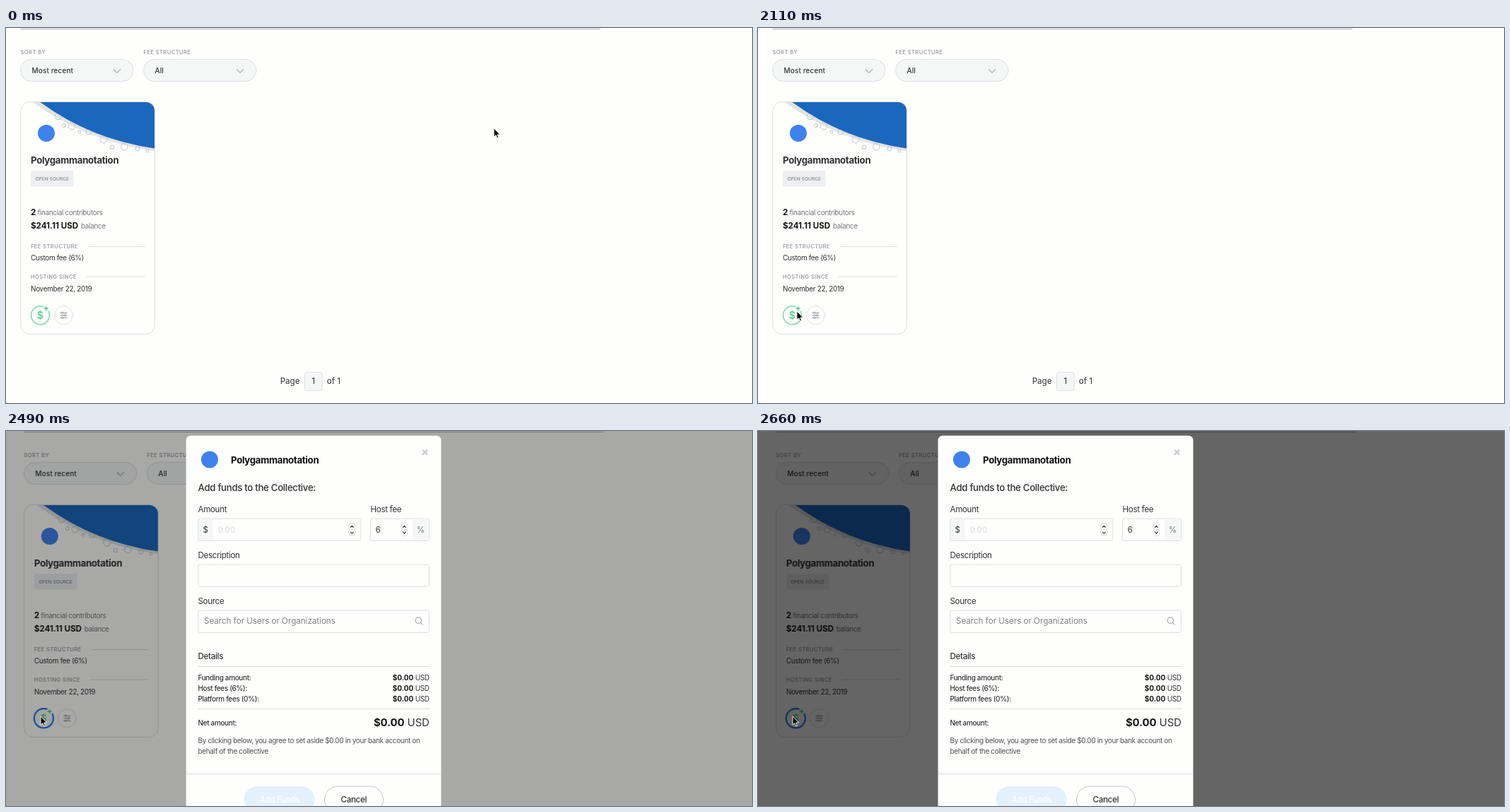
These frames come from a looping animation (1055x531 px, 4.43 s). An HTML page:

```html
<!DOCTYPE html>
<html lang="en">
<head>
<meta charset="utf-8">
<title>Add funds dialog</title>
<style>
  html, body { margin: 0; width: 100%; height: 100%; overflow: hidden; background: #fefefd; }
  svg { display: block; }
  text { font: 400 9.96px Inter, sans-serif; letter-spacing: -.33px; fill: #313233; white-space: pre; }
  .cap { font-size: 7.5px; font-weight: 600; letter-spacing: .45px; fill: #9d9fa3; }
  .mid { font-size: 11.6px; }
  .plain { letter-spacing: 0; }
  .name { font-size: 13.28px; font-weight: 700; }
  .w5 { font-weight: 500; }
  .pick { font-weight: 500; letter-spacing: .15px; }
  .b { font-weight: 700; letter-spacing: 0; fill: #141414; }
  .total { font-size: 14.94px; letter-spacing: -.1px; }
  .soft { fill: #76777a; }
  .note { fill: #4e5052; }
  .end { text-anchor: end; }
  .c { text-anchor: middle; }
  .box { fill: #fefefd; stroke: #dcdee0; }
  .tint { fill: #f5f7f7; }
  .line { fill: none; stroke: #dcdee0; }
  .icon { fill: none; stroke-linecap: round; stroke-linejoin: round; }
  .logo { fill: #3f82ec; }

  /* One loop is 4430 ms; all percentages are moments of that loop. */
  .page, .focus, .modal, .shade, .cursor { animation: 4430ms step-end infinite; }
  .page { animation-name: shift; }
  .focus { animation-name: focus; }
  .modal { animation-name: open; }
  .shade { animation-name: dim; }
  .cursor { animation-name: travel; }

  @keyframes shift { 0% { transform: none; } 54.17%, 100% { transform: translateX(4.8px); } }
  @keyframes focus { 0% { opacity: 0; } 52.59%, 100% { opacity: 1; } }
  @keyframes open { 0% { opacity: 0; } 54.17%, 100% { opacity: 1; } }
  @keyframes dim {
    0% { opacity: 0; }
    54.17% { opacity: .045; }
    55.52% { opacity: .185; }
    56.2% { opacity: .34; }
    56.65% { opacity: .46; }
    57.33% { opacity: .52; }
    58.01% { opacity: .56; }
    58.91% { opacity: .59; }
    60.04%, 100% { opacity: .6; }
  }
  @keyframes travel {
    0% { transform: translate(690px, 142px); }
    29.57% { transform: translate(629px, 160px); }
    31.6% { transform: translate(515px, 200px); }
    33.4% { transform: translate(385px, 254px); }
    35.21% { transform: translate(265px, 308px); }
    37.02% { transform: translate(175px, 347px); }
    38.82% { transform: translate(118px, 369px); }
    40.63% { transform: translate(91px, 377px); }
    43.11% { transform: translate(80px, 384px); }
    44.46% { transform: translate(70px, 391px); }
    45.82% { transform: translate(61px, 397px); }
    47.17% { transform: translate(55px, 401px); }
    48.53% { transform: translate(51px, 403px); }
    49.88%, 100% { transform: translate(49px, 404px); }
  }
</style>
</head>
<body>
<svg width="1055" height="531" viewBox="0 0 1055 531">
  <defs>
    <clipPath id="cardClip"><rect x="21" y="105" width="189" height="328" rx="12"/></clipPath>
    <g id="stepper">
      <rect class="box" x="-4.5" y="-8.5" width="9" height="8.5" rx="2.5"/>
      <rect class="box" x="-4.5" y="0" width="9" height="8.5" rx="2.5"/>
      <path class="icon" stroke="#333" stroke-width="1.2" d="M-2-3.4 0-5.4 2-3.4M-2 3.4 0 5.4 2 3.4"/>
    </g>
    <path id="chevron" class="icon" stroke="#b4b7bb" stroke-width="1.6" d="M-4.5-2.3 0 2.3 4.5-2.3"/>
  </defs>

  <rect width="1055" height="531" fill="#fefefd"/>

  <g class="page">
    <path d="M20.5 1.5H840.5" stroke="#c3c5c8" stroke-width="1.4"/>
    <text class="cap" x="20.5" y="37.3">SORT BY</text>
    <text class="cap" x="194.5" y="37.3">FEE STRUCTURE</text>
    <rect class="box tint" x="20.5" y="44.5" width="159.5" height="31" rx="15.5"/>
    <rect class="box tint" x="194.5" y="44.5" width="159.5" height="31" rx="15.5"/>
    <text class="pick" x="36.5" y="64.4">Most recent</text>
    <text class="pick" x="210.5" y="64.4">All</text>
    <use href="#chevron" x="157" y="61"/>
    <use href="#chevron" x="331" y="61"/>

    <rect class="box" x="20.8" y="104.5" width="189.5" height="329" rx="13"/>
    <g clip-path="url(#cardClip)">
      <path d="M37 104Q114 161 211 174.5V104Z" fill="#e2e3e5"/>
      <g fill="none" stroke="#c2c4c6">
        <circle cx="74" cy="125" r="4.8"/><circle cx="82" cy="138" r="2.6"/>
        <circle cx="93" cy="139" r="4.8"/><circle cx="104" cy="147" r="2"/>
        <circle cx="117" cy="147" r="4"/><circle cx="138" cy="158" r="5"/>
        <circle cx="150" cy="169" r="2.6"/><circle cx="167.5" cy="168" r="4.8"/>
        <circle cx="186" cy="171" r="3"/><circle cx="200" cy="174" r="2"/>
      </g>
      <path d="M47 104Q119 157.5 211 170.7V104Z" fill="#1b67be"/>
    </g>
    <circle class="logo" cx="57" cy="149" r="12"/>
    <text class="name" x="35" y="192.4">Polygammanotation</text>
    <rect x="35" y="202" width="60.5" height="22.5" rx="2" fill="#eeeff1"/>
    <text class="soft plain" x="41.5" y="215.5" style="font-size:6.64px">OPEN SOURCE</text>
    <text class="soft" x="35" y="265.4"><tspan class="b mid">2</tspan><tspan x="44.5">financial contributors</tspan></text>
    <text class="soft" x="35" y="283.6"><tspan class="b mid">$241.11 USD</tspan><tspan x="106">balance</tspan></text>
    <text class="cap" x="35" y="312.3">FEE STRUCTURE</text>
    <text class="cap" x="35" y="355.2">HOSTING SINCE</text>
    <path class="line" d="M116 309.5H197M114 352H197"/>
    <text x="35" y="329.3">Custom fee (6%)</text>
    <text x="35" y="373">November 22, 2019</text>

    <circle cx="48.5" cy="406.8" r="13" fill="#fefefd" stroke="#6bd39c" stroke-width="1.3"/>
    <circle class="focus" cx="48.5" cy="406.8" r="13.6" fill="#f4f8f6" stroke="#1d79e2" stroke-width="2.2"/>
    <circle cx="56.7" cy="397.3" r="4.6" fill="#fefefd"/>
    <path d="M53.7 397.3h6M56.7 394.3v6" stroke="#49c784" stroke-width="1.5"/>
    <text class="c plain" x="48.3" y="411.9" style="font-size:14px;font-weight:600;fill:#5bcd90">$</text>
    <circle class="box" cx="81.5" cy="406.8" r="13"/>
    <g fill="#fefefd" stroke="#8b8d91">
      <path d="M76.5 403.3h10M76.5 406.8h10M76.5 410.3h10"/>
      <circle cx="79.7" cy="403.3" r="1.2"/><circle cx="83.5" cy="406.8" r="1.2"/><circle cx="79.7" cy="410.3" r="1.2"/>
    </g>

    <text class="mid plain" x="387.7" y="504">Page</text>
    <rect class="box tint" x="422.5" y="487.5" width="24.5" height="26" rx="3"/>
    <text class="mid plain c" x="434.5" y="504">1</text>
    <text class="mid plain" x="453.8" y="504">of 1</text>
  </g>

  <rect class="shade" width="1055" height="531"/>

  <g class="modal">
    <rect x="254.5" y="6.5" width="361" height="560" rx="6.5" fill="#fefefd" stroke="#000" stroke-opacity=".16" paint-order="stroke"/>
    <circle class="logo" cx="288" cy="40.5" r="12"/>
    <text class="name" x="318" y="45.8" style="fill:#111">Polygammanotation</text>
    <path d="M589 26.5l7 7M596 26.5l-7 7" stroke="#c3c5c8" stroke-width="2"/>
    <text class="w5" x="271.5" y="85.3" style="font-size:13.28px">Add funds to the Collective:</text>

    <text class="mid" x="271.5" y="114.7">Amount</text>
    <text class="mid" x="515.5" y="114.7">Host fee</text>
    <rect class="box" x="271.8" y="124" width="230" height="31.5" rx="3"/>
    <rect class="tint" x="272.5" y="124.6" width="20.5" height="30.3" rx="2.5"/>
    <text class="mid plain c" x="282.3" y="143.6">$</text>
    <text class="mid plain" x="299.5" y="143.6" style="fill:#dadcdf">0.00</text>
    <use href="#stepper" x="489.3" y="139.8"/>
    <rect class="box" x="515.5" y="124" width="82.8" height="31.5" rx="3"/>
    <rect class="tint" x="575" y="124.6" width="22.7" height="30.3" rx="2.5"/>
    <text class="mid plain" x="522.5" y="143.6">6</text>
    <use href="#stepper" x="563.3" y="139.8"/>
    <text class="mid plain c soft" x="586.5" y="143.6">%</text>

    <text class="mid" x="271.5" y="179.5">Description</text>
    <rect class="box" x="271.8" y="189" width="326.5" height="31.5" rx="3"/>
    <text class="mid" x="271.5" y="245.1">Source</text>
    <rect class="box" x="271.8" y="254" width="326.5" height="31.5" rx="3"/>
    <text class="mid plain" x="280" y="273.3" style="fill:#808285">Search for Users or Organizations</text>
    <g class="icon" stroke="#a5a8ac" stroke-width="1.2">
      <circle cx="583.3" cy="268.3" r="4.2"/><path d="M586.4 271.4l2.8 2.8"/>
    </g>

    <text class="mid w5" x="271.5" y="323.2">Details</text>
    <path class="line" d="M271.5 333.5H599M271.5 393.3H599M255 485.5H615"/>
    <text class="w5" x="271.5" y="353.2">Funding amount:</text>
    <text class="w5" x="271.5" y="367.9">Host fees (6%):</text>
    <text class="w5" x="271.5" y="382.9">Platform fees (0%):</text>
    <text class="end" x="598.7" y="353.2"><tspan class="b">$0.00</tspan> USD</text>
    <text class="end" x="598.7" y="367.9"><tspan class="b">$0.00</tspan> USD</text>
    <text class="end" x="598.7" y="382.9"><tspan class="b">$0.00</tspan> USD</text>
    <text class="w5" x="271.5" y="416.5">Net amount:</text>
    <text class="end total" x="598.8" y="418.2"><tspan class="b total">$0.00</tspan> USD</text>
    <text class="note" x="271.5" y="442">By clicking below, you agree to set aside $0.00 in your bank account on</text>
    <text class="note" x="271.5" y="457.3">behalf of the collective</text>

    <rect x="336.5" y="503" width="100" height="38" rx="19" fill="#e2f1fb"/>
    <text class="mid w5 c" x="386.7" y="526.2" style="fill:#fff">Add Funds</text>
    <rect class="box" x="450.5" y="503" width="83" height="38" rx="19" style="stroke:#c4c7cc"/>
    <text class="mid w5 c" x="491.8" y="526.2">Cancel</text>
  </g>

  <path class="cursor" d="M0 0V12.2L2.8 9.6 4.7 14 6.6 13.2 4.8 9H8.6Z" fill="#000" stroke="#fff" stroke-width=".9"/>
</svg>
</body>
</html>
```
